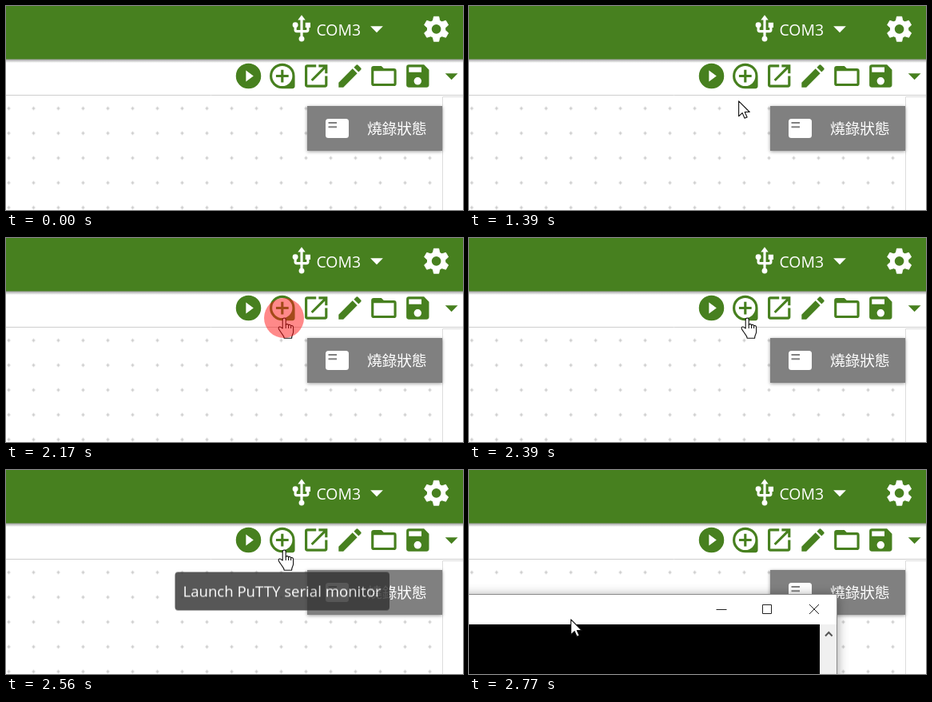
Write an HTML page that moves like this. It is 572 px wide and 255 px high and loops after 5.95 s.

```html
<!DOCTYPE html>
<html lang="zh-Hant">
<head>
<meta charset="utf-8">
<title>Serial monitor launch</title>
<style>
  html, body { margin: 0; width: 100%; height: 100%; overflow: hidden; background: #fff; }
  svg { display: block; }
  text { fill: #fff; font-family: "Open Sans", "Noto Sans", sans-serif; }
  .cjk { font-family: "Noto Sans CJK TC", "Noto Sans CJK", sans-serif; }

  .timed { animation: 5950ms step-end infinite; }
  #arrow { animation-name: arrow; }
  #hand { animation-name: hand; }
  #click { animation-name: click; }
  #tooltip { animation-name: tooltip; }
  #terminal { animation-name: terminal; }
  #frame { filter: drop-shadow(0 2px 7px rgba(0, 0, 0, .4)); }
  #card { filter: drop-shadow(0 1px 2px rgba(0, 0, 0, .4)); }

  @keyframes arrow {
    0% { transform: translate(301px, 300px); }
    16.97% { transform: translate(301px, 249px); }
    18.15% { transform: translate(306px, 230px); }
    19.49% { transform: translate(315px, 194px); }
    20.67% { transform: translate(325px, 158px); }
    22.01% { transform: translate(333px, 132px); }
    23.36% { transform: translate(337px, 118px); }
    24.70% { transform: translate(338px, 113px); }
    25.88% { transform: translate(338px, 300px); }
    46.55%, 100% { transform: translate(127px, 186px); }
  }
  @keyframes hand {
    0% { transform: translate(332px, 300px); }
    25.88% { transform: translate(332px, 108px); }
    27.22% { transform: translate(336px, 104px); }
    28.57% { transform: translate(338px, 101px); }
    29.74% { transform: translate(340px, 100px); }
    31.09% { transform: translate(340px, 99px); }
    46.55%, 100% { transform: translate(340px, 300px); }
  }
  @keyframes click {
    0% { opacity: 0; }
    36.47% { opacity: 1; }
    40.16%, 100% { opacity: 0; }
  }
  @keyframes tooltip {
    0% { opacity: 0; transform: translateY(-10px); }
    41.68% { opacity: .43; transform: translateY(-5px); }
    43.02% { opacity: .82; transform: translateY(-1.5px); }
    44.20% { opacity: 1; transform: none; }
    46.55%, 100% { opacity: 0; transform: none; }
  }
  @keyframes terminal {
    0% { opacity: 0; }
    46.55%, 100% { opacity: 1; }
  }
</style>
</head>
<body>
<svg width="572" height="255" viewBox="0 0 572 255">
  <defs>
    <pattern id="dots" x="-12" y="112.5" width="31" height="31" patternUnits="userSpaceOnUse">
      <path d="M13.5 15.5h4M15.5 13.5v4" stroke="#cdcdcd" stroke-width="1.6"/>
    </pattern>
    <linearGradient id="shade" x2="0" y2="1">
      <stop stop-opacity=".42"/>
      <stop offset="1" stop-opacity="0"/>
    </linearGradient>
    <path id="drop" d="M7 10l5 5 5-5z"/>
    <path id="tooth" d="M-1.9-9.4h3.8l.8 3.6h-5.4z" stroke-width=".5" stroke-linejoin="round"/>
  </defs>

  <!-- workspace -->
  <rect width="572" height="255" fill="#fff"/>
  <rect y="113" width="546" height="142" fill="url(#dots)"/>
  <path d="M0 111.5h572" stroke="#cfcfcf"/>
  <path d="M572 113.5h-25.5V255" fill="none" stroke="#dcdcdc"/>

  <!-- header -->
  <rect y="66" width="572" height="5" fill="url(#shade)"/>
  <rect width="572" height="66.5" fill="#47801f"/>
  <g transform="translate(351.1 9.6) scale(1.575)" fill="#fff">
    <path d="M12 4v16M7 9v4a1 1 0 0 0 1 1h8a1 1 0 0 0 1-1V9" fill="none" stroke="#fff" stroke-width="2"/>
    <path d="M9 5l3-4 3 4zM15 7h4v4h-4z"/>
    <circle cx="7" cy="9" r="2.2"/>
    <circle cx="12" cy="20" r="2.2"/>
  </g>
  <text x="388.5" y="36.5" font-size="19.4">COM3</text>
  <use href="#drop" fill="#fff" transform="translate(445.1 9.6) scale(1.575)"/>
  <g transform="translate(538.6 28.8) scale(1.65)" fill="#fff" stroke="#fff">
    <circle r="5.3" fill="none" stroke-width="3.5"/>
    <use href="#tooth"/>
    <use href="#tooth" transform="rotate(60)"/>
    <use href="#tooth" transform="rotate(120)"/>
    <use href="#tooth" transform="rotate(180)"/>
    <use href="#tooth" transform="rotate(240)"/>
    <use href="#tooth" transform="rotate(300)"/>
  </g>

  <!-- toolbar -->
  <g fill="#47801f">
    <path transform="translate(284.6 68.6) scale(1.575)" d="M12 2a10 10 0 0 0 0 20 10 10 0 0 0 0-20zM10 16.5v-9l6 4.5z" fill-rule="evenodd"/>
    <path transform="translate(326.9 68.6) scale(1.575)" d="M13 7h-2v4H7v2h4v4h2v-4h4v-2h-4zM12 2a10 10 0 0 0 0 20h8a2 2 0 0 0 2-2v-8A10 10 0 0 0 12 2zm0 18a8 8 0 1 1 0-16 8 8 0 0 1 0 16z" fill-rule="evenodd"/>
    <path transform="translate(369.3 68.6) scale(1.575)" d="M19 19H5V5h7V3H5a2 2 0 0 0-2 2v14a2 2 0 0 0 2 2h14a2 2 0 0 0 2-2v-7h-2zM14 3v2h3.6l-9.8 9.8 1.4 1.4L19 6.4V10h2V3z"/>
    <path transform="translate(411.6 68.6) scale(1.575)" d="M3 17.25V21h3.75L17.8 9.94l-3.75-3.75zM20.7 7.04a1 1 0 0 0 0-1.41L18.37 3.3a1 1 0 0 0-1.41 0l-1.83 1.83 3.75 3.75z"/>
    <path transform="translate(454 68.6) scale(1.575)" d="M20 6h-8l-2-2H4a2 2 0 0 0-2 2v12a2 2 0 0 0 2 2h16a2 2 0 0 0 2-2V8a2 2 0 0 0-2-2zm0 12H4V8h16z" fill-rule="evenodd"/>
    <path transform="translate(496.4 68.6) scale(1.575)" d="M17 3H5a2 2 0 0 0-2 2v14a2 2 0 0 0 2 2h14a2 2 0 0 0 2-2V7zm-5 16a3 3 0 1 1 0-6 3 3 0 0 1 0 6zm3-10H5V5h10z" fill-rule="evenodd"/>
    <use href="#drop" transform="translate(538.7 68.6) scale(1.575)"/>
  </g>

  <!-- status card -->
  <rect id="card" x="377" y="125" width="169" height="56" fill="#808080"/>
  <rect x="400" y="141" width="29" height="24" rx="3.5" fill="#fff"/>
  <path d="M403.5 146h10.5M403.5 151.2h10.5" stroke="#808080" stroke-width="2"/>
  <text class="cjk" x="452" y="160" font-size="18.7">燒錄狀態</text>

  <g id="tooltip" class="timed">
    <rect x="211.5" y="129" width="268.5" height="48" rx="4" fill="#333"/>
    <text x="221.5" y="160" font-size="18.6">Launch PuTTY serial monitor</text>
  </g>

  <g id="terminal" class="timed">
    <rect id="frame" x="-60" y="155" width="521" height="160" fill="#8a8a8a"/>
    <path d="M0 156h460v99H0z" fill="#fff"/>
    <path d="M0 193h439v62H0z"/>
    <path d="M439 193h21v62h-21z" fill="#f0f0f0"/>
    <g fill="none" stroke="#222">
      <path d="M309.5 174.5h13M367.5 168.5h11v11h-11zM426 168l12 12M438 168l-12 12"/>
      <path d="M446 207.5l4.3-4.5 4.3 4.5" stroke="#555" stroke-width="2"/>
    </g>
  </g>

  <!-- pointers -->
  <g fill="#fff" stroke="#111" stroke-width="1.1" stroke-linejoin="round">
    <path id="arrow" class="timed" d="M.6.8v19l4.5-4.2 2.9 6.6 3.1-1.3-2.9-6.4h6z"/>
    <g id="hand" class="timed">
      <path d="M6.2 14V3.2c0-3 4-3 4 0v6.3c.8-1.4 3-1 3.4.4 1-.9 2.6-.5 3 .8 1.5-.7 3 .3 3 2v5.5c0 3-2 4-2 8H8.2c0-3-2.9-5-4.7-8.2-1-1.6-2.4-3-2.4-4.2 0-2 2-2.2 3.1-1.2z"/>
      <path d="M10.2 9.5v4.5M13.6 10v4M16.6 11v3" fill="none"/>
    </g>
  </g>
  <circle id="click" class="timed" cx="348" cy="100" r="25" fill="#ff1414" fill-opacity=".5"/>
</svg>
</body>
</html>
```
